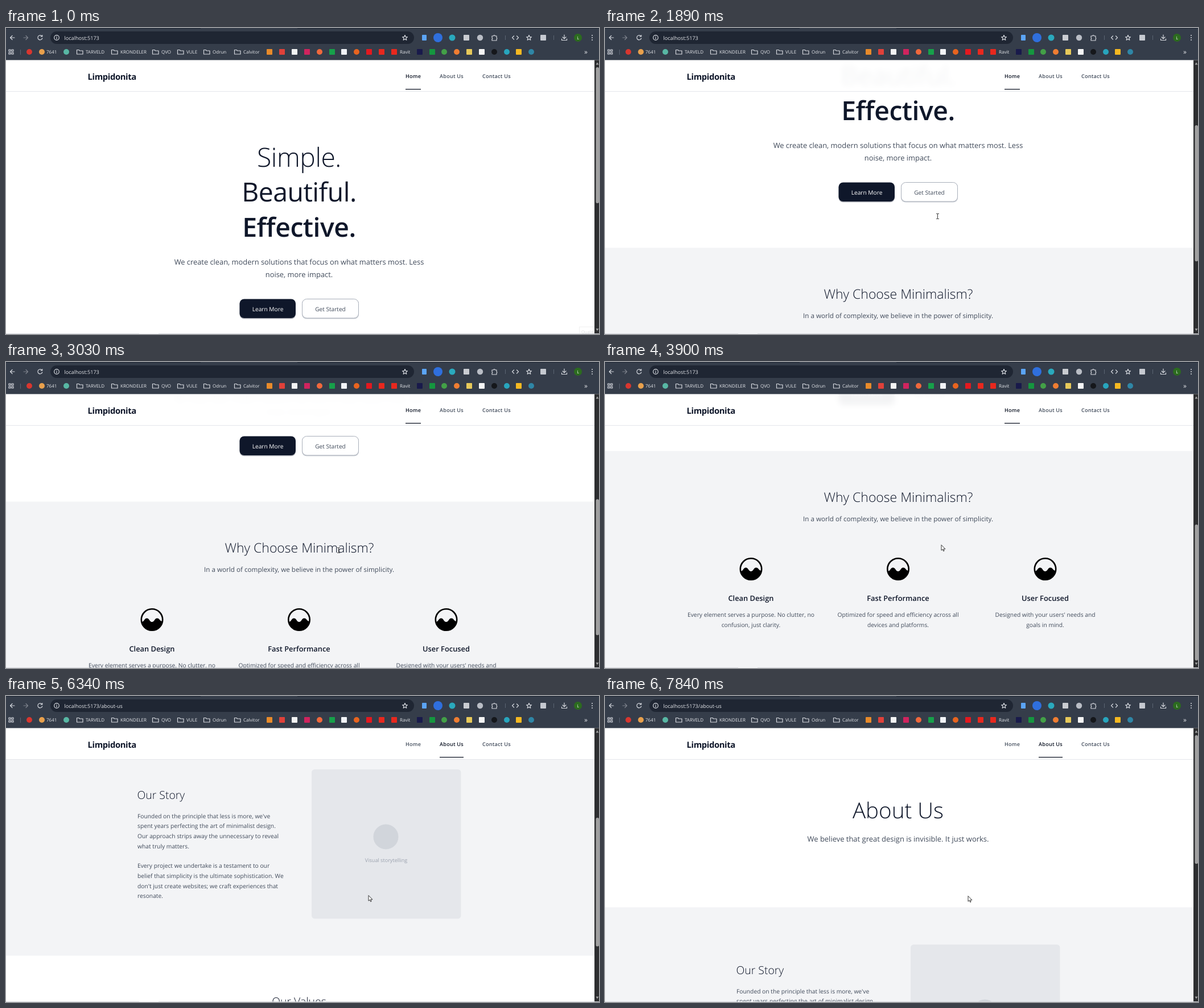
Write an HTML page that moves like this. It is 1042 by 538 pixels and loops after 8 s.

```html
<!DOCTYPE html>
<html lang="en">
<head>
<meta charset="utf-8">
<title>Limpidonita</title>
<style>
  html, body { margin: 0; width: 100%; height: 100%; overflow: hidden; background: #fff; }
  #stage { position: absolute; left: 0; top: 0; width: 1042px; height: 538px; overflow: hidden; background: #fff; }
  #stage > * { position: absolute; left: 0; top: 0; }
  svg { display: block; overflow: visible; }
  text { font-family: "Open Sans", "Noto Sans", sans-serif; text-rendering: geometricPrecision; white-space: pre; }
  .light { font-weight: 300; }
  .medium { font-weight: 500; }
  .semi { font-weight: 600; }
  .mid { text-anchor: middle; }
  .hero { letter-spacing: -.01em; }
  .nav { font-weight: 600; letter-spacing: .025em; }
  .brand { font-weight: 700; letter-spacing: -.025em; }
  .ink { fill: #0f172a; }
  .body { fill: #414b5b; }
  .line { fill: none; stroke: #d5d8de; stroke-width: 1.2; stroke-linecap: round; stroke-linejoin: round; }
  .bar { fill: #e3e5e9; }
  #header { top: 56px; width: 1034px; height: 55px; background: rgba(255, 255, 255, .95);
    backdrop-filter: blur(5.5px); border-bottom: 1px solid #e5e7eb; }
</style>
</head>
<body>
<div id="stage">
  <svg id="home" width="1034" height="973"></svg>
  <svg id="about" width="1034" height="1026"></svg>
  <div id="header"></div>
  <svg id="chrome" width="1042" height="538"></svg>
</div>
<script>
const $ = id => document.getElementById(id);
const text = (x, y, size, str, cls, extra = '') =>
  `<text x="${x}" y="${y}" font-size="${size}" class="${cls}" ${extra}>${str}</text>`;
const lines = (x, y, size, pitch, rows, cls) =>
  rows.map((row, i) => text(x, y + i * pitch, size, row, cls)).join('');
const rect = (x, y, w, h, fill, r = 0, extra = '') =>
  `<rect x="${x}" y="${y}" width="${w}" height="${h}" rx="${r}" fill="${fill}" ${extra}/>`;
const dot = (x, y, r, fill) => `<circle cx="${x}" cy="${y}" r="${r}" fill="${fill}"/>`;
const square = (x, y, fill) => rect(x - 5, y - 5, 10, 10, fill, 1);
const line = (d, extra = '') => `<path class="line" d="${d}" ${extra}/>`;

// Home page
const wave = x => `<g transform="translate(${x} 799)">
  <circle r="18.7" fill="none" stroke="#000" stroke-width="2.6"/>
  <path d="M-18.6 4C-13.500 4-13.500-2.500-9-2.500S-4.500 4 0 4 4.500-2.500 9-2.500 13.500 3 18.700 3A18.900 18.900 0 0 1-18.600 4Z"/></g>`;
const features = [
  [256.5, 'Clean Design', 'Every element serves a purpose. No clutter, no', 'confusion, just clarity.'],
  [515, 'Fast Performance', 'Optimized for speed and efficiency across all', 'devices and platforms.'],
  [773.5, 'User Focused', "Designed with your users' needs and", 'goals in mind.']
];
$('home').innerHTML =
  text(515, 243.7, 46.3, 'Simple.', 'hero light mid ink') +
  text(515, 305, 46.3, 'Beautiful.', 'hero mid ink') +
  text(515, 366.5, 46.3, 'Effective.', 'hero semi mid ink') +
  lines(515, 416, 12.86, 22, ['We create clean, modern solutions that focus on what matters most. Less',
    'noise, more impact.'], 'mid body') +
  rect(410.5, 477, 98.5, 34.5, '#0f172a55', 8) + rect(410.5, 476.5, 98.5, 33.5, '#0f172a', 8) +
  text(460, 497.5, 10.2, 'Learn More', 'medium mid', 'fill="#fff"') +
  rect(520, 477, 100, 34.5, '#9ca3af88', 8) +
  rect(520.5, 476.5, 99, 33.5, '#fff', 8, 'stroke="#a9afba"') +
  text(570, 497.5, 10.15, 'Get Started', 'medium mid body') +
  rect(0, 591.5, 1034, 400, '#f3f4f6') +
  text(515.5, 681, 23, 'Why Choose Minimalism?', 'light mid ink') +
  text(515, 714.5, 11.67, 'In a world of complexity, we believe in the power of simplicity.', 'mid body') +
  features.map(([x, title, ...rows]) => wave(x) + text(x, 855, 12.85, title, 'semi mid ink') +
    lines(x, 883, 10.28, 17.75, rows, 'mid body')).join('');

// About page
const values = [
  ['Simplicity', 'We eliminate the unnecessary to focus', 'on what matters.'],
  ['Quality', 'Every detail is crafted with precision and', 'care.'],
  ['Innovation', 'We push boundaries while maintaining', 'elegance.'],
  ['Integrity', 'Honest communication and transparent', 'processes.']
];
$('about').innerHTML =
  text(515, 214.5, 38.6, 'About Us', 'light mid ink') +
  text(515, 255.5, 12.97, 'We believe that great design is invisible. It just works.', 'mid body') +
  rect(0, 371.5, 1034, 393, '#f3f4f6') +
  text(230.5, 489, 19.4, 'Our Story', 'light ink') +
  lines(231, 522.5, 10.28, 17.8, ["Founded on the principle that less is more, we've",
    'spent years perfecting the art of minimalist design.',
    'Our approach strips away the unnecessary to reveal', 'what truly matters.'], 'body') +
  lines(231, 610, 10.28, 17.8, ['Every project we undertake is a testament to our',
    'belief that simplicity is the ultimate sophistication. We',
    "don't just create websites; we craft experiences that", 'resonate.'], 'body') +
  rect(537, 437, 262.5, 262.5, '#e5e7eb', 5.5) + dot(667.5, 555.5, 22, '#d1d5db') +
  text(668, 599.5, 9.1, 'Visual storytelling', 'mid', 'fill="#9ca3af"') +
  text(515, 851.5, 19.4, 'Our Values', 'light mid ink') +
  values.map(([title, ...rows], i) => text(228 + i * 191.4, 913, 11.65, title, 'semi mid ink') +
    lines(228 + i * 191.4, 937.5, 9.02, 15.6, rows, 'mid body')).join('');

// Browser frame, navigation and pointer
const folders = [[124, 'TARVELD'], [185, 'KRONDELER'], [257, 'QVO'], [301, 'VULE'], [347, 'Odrun'], [401, 'Calvitor']];
const rounds = { 41: '#d8362f', 63: '#e8a04c', 106: '#58b7a4', 551: '#f0683c', 616: '#e8641f',
  770: '#43a047', 792: '#ef7d32', 858: '#15171b', 880: '#28a5bd', 923: '#2f86a6' };
const squares = { 463: '#e88a2a', 485: '#e0413a', 507: '#f4f4f4', 529: '#d0245e', 573: '#17a04a', 594: '#f2f4f8',
  638: '#e3191f', 660: '#e8281e', 682: '#e8281e', 727: '#191a4b', 749: '#15963f', 814: '#e7c95a', 836: '#f5f5f5', 901: '#f6b921' };
const marks = (set, draw) => Object.entries(set).map(([x, fill]) => draw(+x, fill)).join('');

const toolbar =
  rect(0, 0, 1042, 56.4, '#353d4a') + rect(0, 0, 1042, 1, '#1c2430') + rect(342, 0, 170, 1, '#353d4a') +
  rect(78, 6, 639, 22, '#1f2633', 11) +
  line('M15 17H7.500M11 13.500 7.500 17 11 20.500') +
  line('M31 17H38.500M35 13.500 38.500 17 35 20.500', 'opacity=".45"') +
  line('M63.200 14.500A4 4 0 1 0 63.800 18M63.800 12.500V15H61.200') +
  `<circle class="line" cx="89" cy="17" r="4.3"/>` + line('M89 16.700V19.200M89 14.800V14.900') +
  text(102.5, 20.5, 9.1, 'localhost:5173', 'bar', 'id="url"') +
  line('M701 12.500 702.300 15.600 705.500 15.800 703 17.900 703.800 21.200 701 19.400 698.200 21.200 699 17.900 696.500 15.800 699.700 15.600Z') +
  rect(731, 12, 8, 10, '#5ba4f5', 1) + dot(759, 17, 8, '#2f6fdd') + dot(784, 17, 5.5, '#2aa9bd') +
  square(809, 17, '#c9ccd1') + dot(833, 17, 5.2, '#b9bdc5') +
  line('M854 14H856.500A1.600 1.600 0 0 1 859.500 14H862V17A1.400 1.400 0 0 1 862 19.500V22H854V19.500A1.400 1.400 0 0 0 854 17Z') +
  rect(877, 13, 1, 8, '#5b6472') +
  line('M892.500 14 889.500 17 892.500 20M897.500 14 900.500 17 897.500 20') +
  line('M919 12.500 920.300 15.600 923.500 15.800 921 17.900 921.800 21.200 919 19.400 916.200 21.200 917 17.900 914.500 15.800 917.700 15.600Z') +
  square(944, 17, '#c5c9d0') + rect(962, 13, 1, 8, '#5b6472') +
  line('M981 12V18.500M978 16 981 18.700 984 16M976.500 19V21.500H985.500V19') +
  dot(1005, 17, 7, '#2c6b1f') + text(1005, 19.5, 7.2, 'L', 'mid', 'fill="#fff"') +
  [13, 17, 21].map(y => dot(1030, y, 1, '#d5d8de')).join('') +
  [5, 10].map(x => [38, 43].map(y => `<rect class="line" x="${x}" y="${y}" width="3" height="3"/>`).join('')).join('') +
  rect(25, 38, 1, 9, '#5b6472') +
  folders.map(([x, name]) => line(`M${x + .5} 46V38.500H${x + 4}L${x + 5.500} 40H${x + 11}V46Z`) +
    text(x + 16, 45, 8, name, 'bar')).join('') +
  marks(rounds, (x, fill) => dot(x, 42, 5, fill)) + marks(squares, (x, fill) => square(x, 42, fill)) +
  text(71, 45, 8, '7641', 'bar') + text(692, 45, 8, 'Ravit', 'bar') + text(1016, 46, 12, '»', 'bar');

$('chrome').innerHTML = toolbar +
  text(143.5, 90.5, 14.8, 'Limpidonita', 'brand ink') +
  text(702, 88, 9.1, 'Home', 'nav', 'id="navHome"') +
  text(762, 88, 9.1, 'About Us', 'nav', 'id="navAbout"') +
  text(837, 88, 9.1, 'Contact Us', 'nav body') +
  rect(702, 107, 27, 1.3, '#111827', 0, 'id="lineHome"') + rect(762, 107, 42, 1.3, '#111827', 0, 'id="lineAbout"') +
  `<g id="hint" opacity=".18">${rect(1007.5, 525.5, 30, 14, '#fff', 0, 'stroke="#aaa"')}${text(1011, 537, 7.5, 'Quality', 'body')}</g>` +
  rect(1034, 56.4, 8, 481.6, '#2d2e30') +
  `<path fill="#a3a3a3" d="M1036.500 64.500 1039 60.500 1041.500 64.500ZM1036.500 528.500 1039 532.500 1041.500 528.500Z"/>` +
  rect(1036.5, 69, 5.5, 239, '#a0a0a0', 2.5, 'id="thumb"') +
  `<g id="status"><path fill="#1f2633" d="M0 522H89Q92 522 92 525V538H0Z"/>${text(-2, 532.7, 7.85, 'localhost:5173/about-us', 'bar')}</g>` +
  rect(0, 537, 1042, 1, '#d9dbe0') + rect(234, 537, 34, 1, '#f4f5f7') +
  `<g id="pointer" stroke-linejoin="round" stroke-linecap="round">
    <path id="arrow" fill="#fff" stroke="#222" stroke-width=".9" d="M0 0V9.200L2.200 7.300 3.700 10.600 5.100 10 3.700 6.800H6.600Z"/>
    <path id="beam" fill="none" stroke="#222" stroke-width=".9" d="M-2-4.500H-.6L0-4 .6-4.500H2M0-4V4M-2 4.500H-.6L0 4 .6 4.500H2"/>
    <path id="hand" fill="#fff" stroke="#222" stroke-width=".9" d="M-1 1Q0-.500 1 1V4.500L4.300 5.200Q5.300 5.500 5.200 7L4.600 11H-.5L-3.300 7.200Q-3.600 5.700-2.200 5.900L-1 7Z"/>
  </g>`;

// Motion: curves, and moves drawn in evenly spaced steps
const LOOP = 8000, SWITCH = 5170;
const curve = (a, b) => p => 1 - (1 - p ** a) ** b;
const wheel = curve(2.3, 4.19), spin = curve(2, 1.63), glide = curve(1.6, 2), swap = curve(2, 3.5);
const clamp = p => Math.max(0, Math.min(1, p));
const mix = (a, b, p) => a + (b - a) * p;

function follow(t, value, moves) {
  for (const [start, end, steps, to, ease] of moves) {
    if (t < start) break;
    const step = Math.min(steps, Math.floor((t - start) / (end - start) * (steps - 1) + 1e-6) + 1);
    value = mix(value, to, ease(step / steps));
    if (step < steps) break;
  }
  return value;
}
const homeScroll = [[1040, 1460, 7, 136.6, wheel], [1680, 1890, 4, 204.9, wheel],
  [2160, 2570, 7, 341.5, wheel], [3030, 3440, 7, 434.5, wheel]];
const aboutScroll = [[6060, 6470, 7, 298, wheel], [6540, 7290, 12, 25, spin], [7690, 7840, 3, 0, glide]];
const pointerMoves = axis => [[370, 710, 6, [584, 331]], [3900, 4680, 12, [771, 87]],
  [5720, 6130, 7, [637, 351]], [6960, 6960.1, 1, [638, 352]]].map(([a, b, n, to]) => [a, b, n, to[axis], glide]);
const pointerX = pointerMoves(0), pointerY = pointerMoves(1);

const show = (id, on) => { $(id).style.display = on ? '' : 'none'; };
const place = (id, x, y) => $(id).setAttribute('transform', `translate(${x} ${y})`);
const shade = p => `rgb(${mix(70, 17, p)},${mix(80, 24, p)},${mix(95, 39, p)})`;
const underline = (id, x, w, p) => {
  $(id).setAttribute('x', x + w * (1 - p) / 2);
  $(id).setAttribute('width', w * p);
};

function draw(t) {
  const onAbout = t >= SWITCH;
  const scroll = Math.round(onAbout ? follow(t, 434.5, aboutScroll) : follow(t, 0, homeScroll));
  show('home', !onAbout);
  show('about', onAbout);
  $(onAbout ? 'about' : 'home').style.transform = `translateY(${-scroll}px)`;
  const ratio = onAbout ? .471 : .498;
  $('thumb').setAttribute('y', 69 + scroll * ratio);
  $('thumb').setAttribute('height', 480 * ratio);
  $('url').textContent = 'localhost:5173' + (onAbout ? '/about-us' : '');

  const active = swap(clamp((t - SWITCH) / 300));
  const hover = swap(clamp((t - 4610) / 280)) * (1 - swap(clamp((t - 5790) / 280)));
  underline('lineHome', 702, 27, 1 - active);
  underline('lineAbout', 762, 42, active);
  $('navHome').style.fill = shade(1 - active);
  $('navAbout').style.fill = shade(Math.max(active, hover));
  place('navAbout', 0, -hover);
  show('hint', t < 1040);
  $('status').style.opacity = clamp((t - 4990) / 120) * (1 - clamp((t - 5860) / 200));

  const x = follow(t, 1000, pointerX), y = follow(t, 556, pointerY);
  const hand = t > 3900 && x > 758 && y < 100;
  const beam = t < 3900 && y < 384;
  show('pointer', t >= 370);
  show('hand', hand);
  show('beam', beam);
  show('arrow', !hand && !beam);
  place('pointer', Math.round(x) + (beam ? .5 : 0), Math.round(y));
}

function tick(now) {
  draw(now % LOOP);
  requestAnimationFrame(tick);
}
draw(0);
requestAnimationFrame(tick);
</script>
</body>
</html>
```
